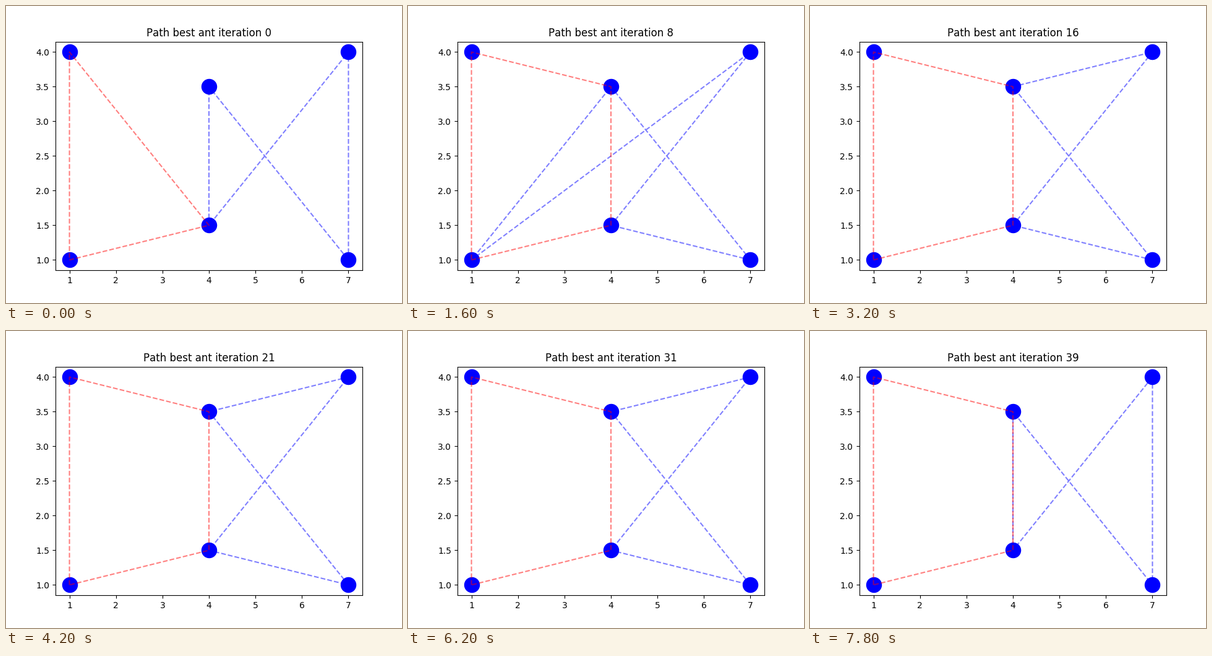
Animation, 640 px wide and 480 px high, one loop 8000 ms. Source, as a matplotlib script:

```python
import matplotlib.pyplot as plt
from matplotlib.animation import FuncAnimation

FRAMES = 40
INTERVAL = 200

CITIES = [(1, 1), (1, 4), (4, 1.5), (4, 3.5), (7, 1), (7, 4)]
SQUARE = [0, 1, 3, 2]

# first iteration, red tour, blue tour, blue drawn on top
STAGES = [
    (0, [0, 1, 2], [4, 3, 2, 5], False),
    (1, SQUARE, [4, 3, 0, 5, 2], False),
    (16, SQUARE, [4, 3, 5, 2], False),
    (27, SQUARE, [4, 1, 5, 2, 3], True),
    (28, SQUARE, [4, 3, 5, 2], False),
    (38, SQUARE, [5, 4, 3, 2], False),
]

plt.rcParams["text.kerning_factor"] = 6

fig, ax = plt.subplots(figsize=(6.4, 4.8), dpi=100)
ax.scatter(*zip(*CITIES), s=300, color="blue", zorder=1)
ax.autoscale_view()
ax.autoscale(False)
title = ax.set_title("")
red, = ax.plot([], [], "--", color="red", alpha=0.5)
blue, = ax.plot([], [], "--", color="blue", alpha=0.5)


def walk(tour, backwards):
    """Coordinates of the closed tour."""
    loop = tour + tour[:1]
    if backwards:
        loop.reverse()
    return list(zip(*(CITIES[i] for i in loop)))


def update(i):
    _, red_tour, blue_tour, blue_top = [s for s in STAGES if s[0] <= i][-1]
    # the ants turn round on every other iteration
    backwards = i % 2 == 0
    red.set_data(*walk(red_tour, backwards))
    blue.set_data(*walk(blue_tour, backwards))
    red.set_zorder(3)
    blue.set_zorder(4 if blue_top else 2)
    title.set_text(f"Path best ant iteration {i}")
    return red, blue, title


anim = FuncAnimation(fig, update, frames=FRAMES, interval=INTERVAL,
                     init_func=lambda: update(0), repeat=True, repeat_delay=0)
plt.show()
```
